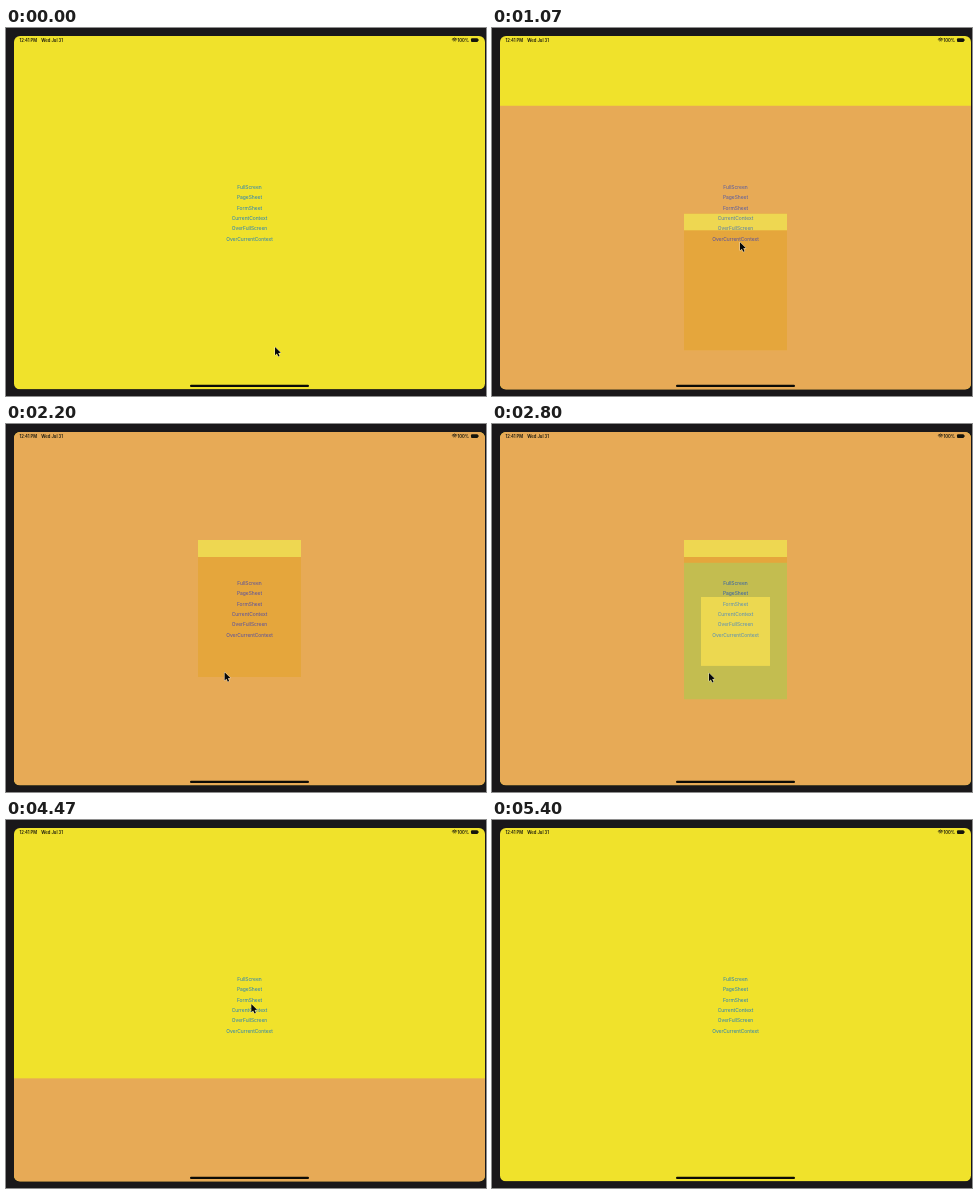
Recreate the animation shown at these times as an HTML page with a canvas. Size 480 by 368 pixels, loop 5.74 s.

```html
<!DOCTYPE html>
<html lang="en">
<head>
<meta charset="utf-8">
<title>Modal presentation styles</title>
<style>
  html, body { margin: 0; width: 100%; height: 100%; overflow: hidden; background: #1a181a; }
  canvas { display: block; width: 480px; height: 368px; }
</style>
</head>
<body>
<canvas id="stage"></canvas>
<script>
const LOOP = 5740, STEP = 1000 / 15;
const W = 480, H = 368;
const SCREEN = { x: 8, y: 8, w: 471, h: 353.5 };
const SANS = 'Inter, Roboto, sans-serif';
const LABELS = ['FullScreen', 'PageSheet', 'FormSheet', 'CurrentContext', 'OverFullScreen', 'OverCurrentContext'];

// Pointer tip: time, x, y
const POINTER = [
  [0, 269, 319], [600, 251.5, 209.5], [933, 251.5, 209.5], [1333, 238, 228],
  [2067, 219, 248], [2533, 217, 249], [3200, 217, 249], [3667, 246.5, 183],
  [4200, 246.5, 183], [4467, 245.3, 184], [4600, 245.3, 184], [4933, 328, 82]
];
const POINTER_GONE = 4990;

const canvas = document.getElementById('stage');
const ctx = canvas.getContext('2d');
const ratio = window.devicePixelRatio || 1;
canvas.width = W * ratio;
canvas.height = H * ratio;

// Share of the way still to go for a critically damped spring
function rest(t, start, rate) {
  const s = Math.max(0, t - start) / 1000 * rate;
  return (1 + s) * Math.exp(-s);
}

function pointerAt(t) {
  const i = POINTER.findIndex(key => key[0] > t);
  if (i < 0) return POINTER[POINTER.length - 1].slice(1);
  const [t0, x0, y0] = POINTER[i - 1], [t1, x1, y1] = POINTER[i];
  const p = (t - t0) / (t1 - t0), e = p * p * (3 - 2 * p);
  return [x0 + (x1 - x0) * e, y0 + (y1 - y0) * e];
}

function text(str, x, y, size, weight, align, color) {
  ctx.font = `${weight} ${size}px ${SANS}`;
  ctx.textAlign = align;
  ctx.fillStyle = color;
  ctx.fillText(str, x, y);
}

// A filled area that tints the fixed labels seen through it
function layer(x, y, w, h, fill, ink, pressed) {
  if (h <= 0) return;
  ctx.save();
  ctx.beginPath();
  ctx.rect(x, y, w, h);
  ctx.clip();
  ctx.fillStyle = fill;
  ctx.fillRect(x, y, w, h);
  LABELS.forEach((label, i) => {
    ctx.globalAlpha = pressed && i === 5 ? 0.25 : 1;
    text(label, 243.5, 160.8 + i * 10.37, 4.9, 400, 'center', ink);
  });
  ctx.restore();
}

function statusBar() {
  text('12:41 PM', 13.4, 13.7, 4.2, 600, 'left', '#16150c');
  text('Wed Jul 31', 35.2, 13.7, 4.2, 600, 'left', '#16150c');
  text('100%', 463, 13.7, 4.2, 600, 'right', '#16150c');
  ctx.strokeStyle = ctx.fillStyle = '#16150c';
  ctx.lineWidth = 0.8;
  for (const r of [1.3, 2.5, 3.7]) {
    ctx.beginPath();
    ctx.arc(448.5, 14, r, -Math.PI * 0.75, -Math.PI * 0.25);
    ctx.stroke();
  }
  ctx.beginPath();
  ctx.roundRect(465, 10.2, 7, 3.8, 1);
  ctx.fill();
  ctx.fillRect(472.4, 11.3, 0.6, 1.6);
}

function pointer(x, y) {
  ctx.save();
  ctx.translate(x, y);
  ctx.beginPath();
  const points = [[0, 0], [0, 8.2], [1.9, 6.5], [3.2, 9.5], [4.6, 8.9], [3.3, 6], [5.8, 5.8]];
  points.forEach(([px, py]) => ctx.lineTo(px, py));
  ctx.closePath();
  ctx.strokeStyle = 'rgba(255,255,255,.65)';
  ctx.lineWidth = 1;
  ctx.stroke();
  ctx.fillStyle = '#080808';
  ctx.fill();
  ctx.restore();
}

function draw(t) {
  const { x, y, w, h } = SCREEN;
  const leaving = 1 - rest(t, 4338, 19.2);
  const sheet = 354 * (rest(t, 878, 16) + leaving);
  const card = 137 * rest(t, 2597, 16);
  const pressed = t >= 730 && t < 1060;

  ctx.setTransform(ratio, 0, 0, ratio, 0, 0);
  ctx.fillStyle = '#1a181a';
  ctx.fillRect(0, 0, W, H);

  ctx.save();
  ctx.beginPath();
  ctx.roundRect(x, y, w, h, 6);
  ctx.clip();
  layer(x, y, w, h, '#f0e22b', '#1d7cc0', pressed);

  if (sheet < 353.9) {
    const top = 116 + sheet, cardTop = top + card;
    layer(x, y + sheet, w, h, '#e7aa56', '#5058a6', pressed);
    layer(192, top, 103, 137, '#e5a63c', '#4f4ca6');
    layer(192, top, 103, 17, '#eed751', '#4f78b0');
    if (t > 2597) {
      layer(192, cardTop, 103, 137, '#c3bd50', '#2c5cae');
      layer(192, cardTop, 103, top + 17 - cardTop, '#c4c955', '#2c5cae');
      layer(209, cardTop + 34.3, 69, 69, '#ecd850', '#4f8bbd');
    }
  }

  statusBar();
  ctx.fillStyle = '#0c0b06';
  ctx.beginPath();
  ctx.roundRect(184, 356.8, 119, 2.3, 1.1);
  ctx.fill();
  ctx.restore();

  if (t < POINTER_GONE) pointer(...pointerAt(t));
}

function tick() {
  const t = performance.now() % LOOP;
  draw(Math.floor((t + 4) / STEP) * STEP);
  requestAnimationFrame(tick);
}
tick();
</script>
</body>
</html>
```
